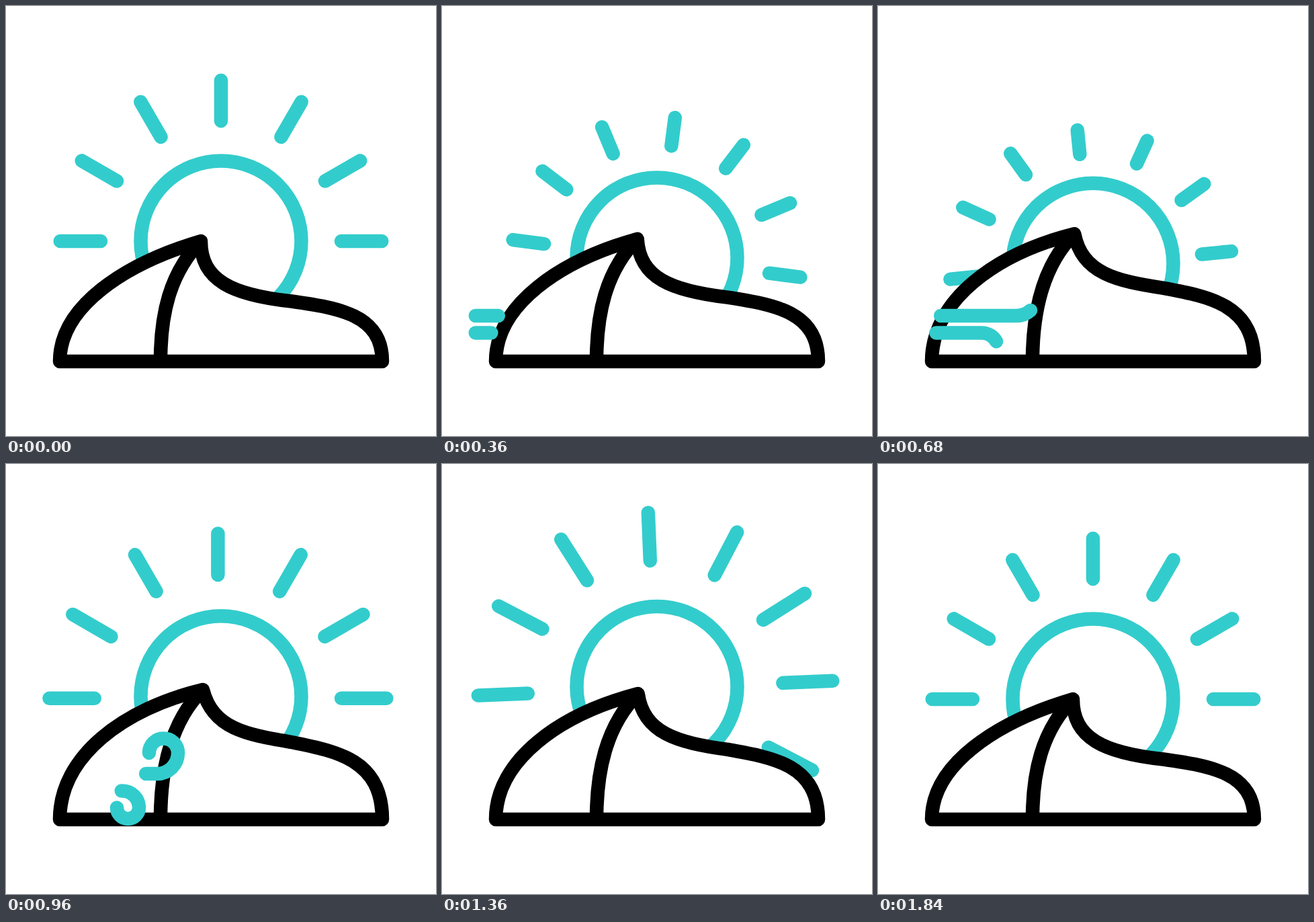
Animation of 640 by 640 pixels, one loop 2000 ms. Source, as an HTML page:

```html
<!DOCTYPE html>
<html lang="en">
<head>
<meta charset="utf-8">
<title>Sun over a dune</title>
<style>
  html, body { margin: 0; width: 100%; height: 100%; overflow: hidden; background: #fff; }
  svg { display: block; width: 100vw; height: 100vh; }
  path, circle { stroke-width: 20.5; }
  .line { fill: none; stroke: #33cccc; stroke-linecap: round; }
  .dune { fill: #fff; stroke: #000; stroke-linejoin: round; }
  #fold { fill: none; }
</style>
</head>
<body>
<svg viewBox="0 0 640 640">
  <clipPath id="sky"><rect width="640" height="529"/></clipPath>
  <g clip-path="url(#sky)">
    <circle id="sun" class="line" cx="320" r="119.5"/>
    <path id="rays" class="line"/>
  </g>
  <path id="dune" class="dune"/>
  <path id="fold" class="dune"/>
  <g id="wind">
    <path class="line" pathLength="1" d="M90 461H225A31 31 0 0 0 256 430A21.5 21.5 0 0 0 213 430"/>
    <path class="line" pathLength="1" d="M90 486.5H173A25 25 0 0 1 198 511.5A16.5 16.5 0 0 1 165 511.5"/>
  </g>
</svg>
<script>
const LOOP = 2000, STEP = 40;
const START = 80, SET = 555, RISEN = 1190, END = 1840;
const TAU = 2 * Math.PI;
const { sin, cos } = Math;
const $ = id => document.getElementById(id);
const sun = $('sun'), rays = $('rays'), dune = $('dune'), fold = $('fold'), wind = $('wind');

const ramp = (t, from, to) => Math.min(1, Math.max(0, (t - from) / (to - from)));
const glide = (t, from, to) => (1 - cos(Math.PI * ramp(t, from, to))) / 2;

// Goes from rest to the sunken value, to the risen value and back.
const bob = (t, rest, sunk, risen) => rest
  + (sunk - rest) * glide(t, START, SET)
  + (risen - sunk) * glide(t, SET, RISEN)
  + (rest - risen) * glide(t, RISEN, END);

// One full turn, slow at both ends and a little slower halfway.
function turn(t) {
  const a = TAU * ramp(t, START, END);
  return a - 0.22 * sin(a) - 0.11 * sin(2 * a) - 0.087 * sin(a) ** 2;
}

function drawSun(t) {
  const y = bob(t, 350, 389, 328);
  const inner = bob(t, 179, 163.3, 192);
  const outer = bob(t, 239.3, 195.5, 265.7);
  const spin = turn(t), sway = sin(spin / 2);
  const cx = 320 - 4.6 * sway * sway, cy = y + 3 * sway;
  const widen = 6 * sway + 0.1 * (y - 350);
  let d = '';
  for (let i = 0; i < 12; i++) {
    const s = sin(spin + i * TAU / 12), c = cos(spin + i * TAU / 12);
    if (c < -0.47) continue; // behind the dune
    const point = r => `${cx + r * s} ${cy - r * c}`;
    d += `M${point(inner)}L${point(outer + widen * s * s)}`;
  }
  sun.setAttribute('cy', y);
  rays.setAttribute('d', d);
}

function drawDune(t) {
  const k = (1 - cos(TAU * ramp(t, START, END))) / 2;
  const peak = `${290 + 3 * k} ${350 - 14 * k}`;
  dune.setAttribute('d', `M80 529C80 ${448 - 13 * k} 175 ${384 - 20 * k} ${peak}`
    + `C${290 + 18 * k} ${408 - 13 * k} ${336 + 24 * k} ${430 - 27 * k} 425 ${439.5 - 25.5 * k}`
    + `C495 ${449.5 - 21.5 * k} 560 ${459 - 18 * k} 560 529Z`);
  fold.setAttribute('d', `M230 529C230 460 243 ${398 - 13 * k} ${peak}`);
}

function drawWind(t) {
  const head = ramp(t, 272, 920), tail = ramp(t, 616, 1346);
  wind.style.display = head > tail ? '' : 'none';
  wind.setAttribute('transform', `translate(${(t - 960) * 0.067} 0)`);
  for (const line of wind.children) {
    line.setAttribute('stroke-dasharray', `${head - tail} 3`);
    line.setAttribute('stroke-dashoffset', -tail);
  }
}

function draw(now) {
  const t = Math.floor((now % LOOP) / STEP) * STEP;
  drawSun(t);
  drawDune(t);
  drawWind(t);
}

let origin = null;
function tick(now) {
  if (origin === null) origin = now;
  draw(Math.max(0, now - origin));
  requestAnimationFrame(tick);
}
draw(0);
requestAnimationFrame(tick);
</script>
</body>
</html>
```
